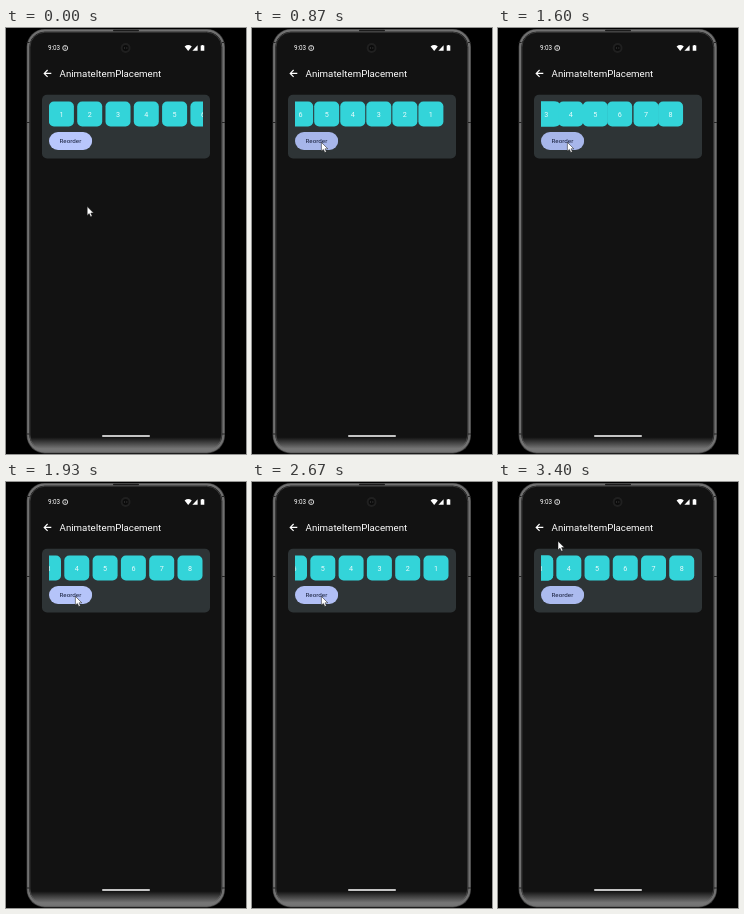
An HTML page that plays this animation: 240x426 px, repeating every 3470 ms.

```html
<!DOCTYPE html>
<html lang="en">
<head>
<meta charset="utf-8">
<title>AnimateItemPlacement</title>
<style>
html, body { margin: 0; width: 100%; height: 100%; overflow: hidden; background: #000; }
svg { display: block; width: 100%; height: 100%; font-family: Roboto, sans-serif; }
</style>
</head>
<body>
<svg viewBox="0 0 240 426" xmlns="http://www.w3.org/2000/svg">
  <defs>
    <clipPath id="row"><rect x="43" y="70" width="154" height="32"/></clipPath>
    <clipPath id="pill"><rect x="43" y="104" width="43.2" height="18" rx="9"/></clipPath>
    <linearGradient id="glow" x1="0" y1="0" x2="0" y2="1">
      <stop offset=".966" stop-color="#757575" stop-opacity="0"/>
      <stop offset=".993" stop-color="#757575"/>
    </linearGradient>
  </defs>
  <rect width="240" height="426" fill="#000"/>

  <!-- phone -->
  <rect x="20.6" y="1" width="198.4" height="424.4" rx="18" fill="#3a3a3a"/>
  <rect x="22.3" y="2.6" width="195" height="421" rx="16.5" fill="#121212" stroke="#707070" stroke-width="2.2"/>
  <rect x="23.9" y="4.2" width="191.8" height="417.8" rx="15" fill="#121212" stroke="#3c3c3c" stroke-width="1"/>
  <rect x="22.3" y="2.6" width="195" height="421" rx="16.5" fill="url(#glow)"/>
  <path d="M20.6 14.5h3M216 14.5h3M20.6 94.5h3M216 94.5h3M20.6 406h3M216 406h3" stroke="#222" stroke-width="1.2"/>
  <rect x="107" y="1.8" width="26" height="1.5" rx=".7" fill="#1c1c1c"/>
  <circle cx="119.6" cy="20" r="4.9" fill="#202020"/>
  <circle cx="119.6" cy="20" r="3" fill="#0c0c0c"/>
  <path d="M118 20h1M120.3 20h1" stroke="#444" stroke-width="1"/>

  <!-- status bar -->
  <text x="42" y="22.2" font-size="6.3" fill="#fff">9:03</text>
  <g fill="none" stroke="#fff" stroke-width=".8">
    <circle cx="59.2" cy="20" r="2.5"/>
    <path d="M59.2 19.6v1.7M59.2 18.3v.7"/>
  </g>
  <g fill="#fff">
    <path d="M178.6 18.4q3.6-2.7 7.2 0l-3.6 4.5z"/>
    <path d="M191.6 17.2v5.6h-5.2z"/>
    <path d="M195.7 16.9h1.6v.7h1v5.2h-3.6v-5.2h1z"/>
  </g>

  <!-- app bar -->
  <path d="M45.3 45.4h-7M41.6 42l-3.4 3.4 3.4 3.4" fill="none" stroke="#fff" stroke-width="1.15"/>
  <text x="53.6" y="48.8" font-size="9.7" fill="#fff">AnimateItemPlacement</text>

  <!-- card -->
  <rect x="36" y="66.8" width="168" height="63.7" rx="5" fill="#2e3436"/>
  <g clip-path="url(#row)"><g id="tiles"></g></g>
  <g clip-path="url(#pill)">
    <rect x="43" y="104" width="43.2" height="18" fill="#b8c6fc"/>
    <circle id="ripple" cx="69" cy="114" r="0" fill="#1d3561"/>
  </g>
  <text x="64.4" y="115.2" font-size="6.25" text-anchor="middle" fill="#141c38">Reorder</text>

  <rect x="96" y="407.2" width="48" height="1.6" rx=".8" fill="#fff"/>
  <path id="cursor" d="M0 0V8.8L2 7 3.4 10.1 5 9.4 3.6 6.4H6.4Z" fill="#fff" stroke="#111" stroke-width=".5"/>
</svg>
<script>
const LOOP = 3470, CLICKS = [620, 1382, 2172, 2965];
const PITCH = 28.3, FIRST = 55.4, LAST = 184;
const $ = id => document.getElementById(id);
const clamp = v => Math.min(1, Math.max(0, v));
const mix = (a, b, p) => a + (b - a) * p;

// Where each number sits in the three layouts of the row.
const start = { low: 1, high: 6, at: n => FIRST + PITCH * (n - 1) };
const reversed = { low: 1, high: 6, at: n => LAST - PITCH * (n - 1), flip: true };
const ordered = { low: 3, high: 8, at: n => LAST - PITCH * (8 - n) };
const states = [start, reversed, ordered, reversed, ordered];
const shows = (s, n) => n >= s.low && n <= s.high;
// Tiles outside the view enter and leave one step closer to its edge.
const place = (s, n) => s.at(n) + (shows(s, n) ? 0 : PITCH);

function add(tag, attrs, parent) {
  const el = document.createElementNS("http://www.w3.org/2000/svg", tag);
  for (const k in attrs) el.setAttribute(k, attrs[k]);
  return parent.appendChild(el);
}

const tiles = [1, 2, 3, 4, 5, 6, 7, 8].map(n => {
  const g = add("g", {}, $("tiles"));
  add("rect", { x: -12.5, y: 73.5, width: 25, height: 25, rx: 5, fill: "#33d4d9" }, g);
  add("text", { x: 0, y: 88.7, "font-size": 7.2, "text-anchor": "middle", fill: "#e8fcfc" }, g).textContent = n;
  return { n, g };
});

// Critically damped spring, stiffness 400.
const spring = ms => {
  const x = ms * 0.02;
  return 1 - (1 + x) * Math.exp(-x);
};

function drawTiles(t) {
  const k = CLICKS.filter(c => t >= c).length;
  const to = states[k], from = states[Math.max(0, k - 1)];
  const age = k ? t - CLICKS[k - 1] : 9999;
  const p = age > 480 ? 1 : spring(age);
  const list = to.flip ? [...tiles].reverse() : tiles;
  const leaving = list.filter(o => !shows(to, o.n));
  const staying = list.filter(o => shows(to, o.n));
  for (const { n, g } of [...leaving, ...staying]) {
    const visible = shows(to, n) || (p < 1 && shows(from, n));
    g.setAttribute("display", visible ? "inline" : "none");
    g.setAttribute("transform", `translate(${mix(place(from, n), place(to, n), p).toFixed(2)} 0)`);
    $("tiles").appendChild(g);
  }
}

function drawRipple(t) {
  const press = CLICKS.map(c => c - 40).filter(c => t >= c).pop();
  const age = press === undefined ? 9999 : t - press;
  const fade = clamp(age / 75) * (1 - clamp((age - 420) / 200));
  $("ripple").setAttribute("r", mix(8, 34, clamp(age / 220)));
  $("ripple").setAttribute("opacity", 0.11 * fade);
}

function drawCursor(t) {
  const u = clamp((t - 60) / 470), come = u * u * (3 - 2 * u);
  const go = 1 - Math.pow(1 - clamp((t - 3000) / 400), 3);
  const x = mix(mix(81.2, 69.4, come), 60, go);
  const y = mix(mix(178.6, 114.4, come), 59.2, go);
  $("cursor").setAttribute("transform", `translate(${x.toFixed(2)} ${y.toFixed(2)})`);
}

function draw(t) {
  drawTiles(t);
  drawRipple(t);
  drawCursor(t);
}

const t0 = performance.now();
function tick() {
  draw((performance.now() - t0) % LOOP);
  requestAnimationFrame(tick);
}
tick();
</script>
</body>
</html>
```
